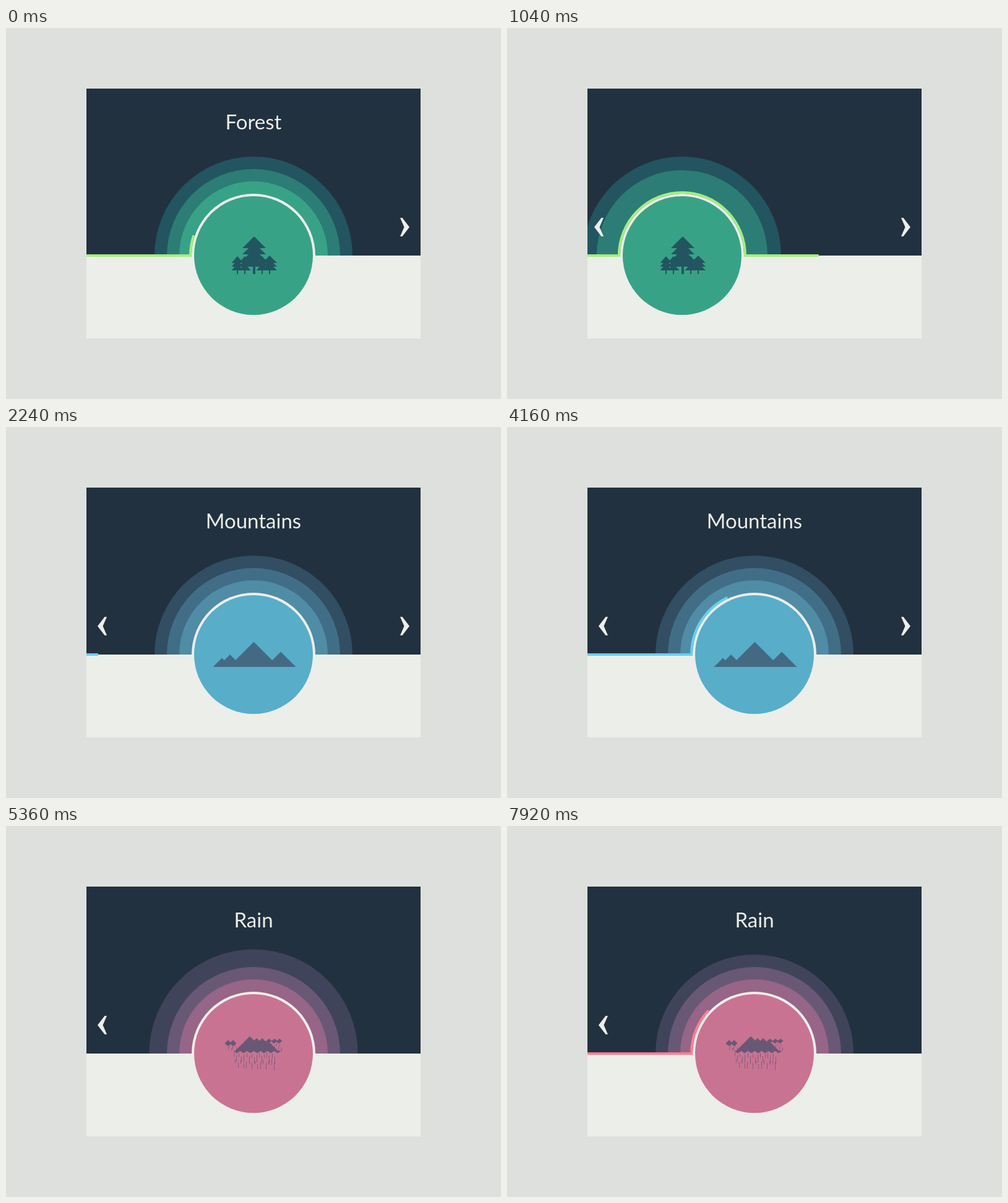
An HTML page with a canvas that plays this animation: 800x600 px, repeating every 8000 ms.

```html
<!DOCTYPE html>
<html lang="en">
<head>
<meta charset="utf-8">
<title>Landscape slider</title>
<style>
  html, body { margin: 0; width: 100%; height: 100%; overflow: hidden; background: #dde0dd; }
  canvas { display: block; }
</style>
</head>
<body>
<canvas id="stage" width="800" height="600"></canvas>
<script>
const ctx = document.getElementById('stage').getContext('2d');
const LOOP = 8000, STEP = 80;
const GAP = 3880;            // time between two slide changes
const SWITCH = 880;          // start of a slide change
const CX = 400, HORIZON = 368;
const CARD = { x: 130, y: 98, w: 540, h: 404 };
const PAGE = '#dde0dd', DARK = '#22313f', LIGHT = '#eceeea';

// Share of a tween that has passed, from 0 to 1.
const part = (t, start, length) => Math.min(1, Math.max(0, (t - start) / length));
const cubicIn = p => p ** 3;
const cubicOut = p => 1 - (1 - p) ** 3;
const cubicInOut = p => p < 0.5 ? 4 * p ** 3 : 1 - 4 * (1 - p) ** 3;
const backOut = p => 1 + 2.70158 * (p - 1) ** 3 + 1.70158 * (p - 1) ** 2;

const slide = t => CARD.w * cubicInOut(part(t, 900, 370));
const arrowIn = t => cubicOut(part(t, SWITCH, 370));

// The line speeds up exponentially until it stops short of the card edge.
const lineLength = u => Math.min(606.5, 13.6 * Math.expm1(0.00115 * Math.max(0, u - 1480)));

// Rings pop open one after another, then shrink in the same order.
function ringRadius(i, u) {
  const open = backOut(part(u, 1085 + 100 * i, 250));
  const shut = cubicIn(part(u, SWITCH + GAP + 100 * i, 250));
  return Math.max(0, (120 + 20 * i) * open * (1 - shut));
}

function poly(...pts) {
  ctx.beginPath();
  for (let i = 0; i < pts.length; i += 2) ctx.lineTo(pts[i], pts[i + 1]);
  ctx.closePath();
  ctx.fill();
}

function disc(r, color) {
  ctx.fillStyle = color;
  ctx.beginPath();
  ctx.arc(CX, HORIZON, r, 0, 7);
  ctx.fill();
}

// Triangle on a flat base; a negative height points down.
const peak = (x, base, half, height = half) =>
  poly(x - half, base, x, base - height, x + half, base);

function tree(x, base, half, height, gap, trunk) {
  for (let i = 0; i < 3; i++) peak(x, base - i * gap, half, height);
  ctx.fillRect(x - trunk / 2, base, trunk, 398 - base);
}

function forest() {
  tree(401, 376, 19, 19, 10, 4);
  peak(401, 386, 20, 29);
  for (const x of [374, 386, 414]) tree(x, 392, 9.5, 11, 6, 2);
  tree(426, 392, 12, 12, 6, 2);
}

function mountains() {
  peak(349, 388, 14.5);
  peak(362, 388, 20);
  peak(400.5, 388, 40.5);
  peak(444, 388, 24.5);
}

function drops(x, y, count, gap, size) {
  for (let i = 0; i < count; i++) {
    const a = (i * 0.618) % 1, b = (i * 0.414 + 0.2) % 1;
    ctx.fillRect(Math.round(x + i * gap), Math.round(y + a * 8), 1, size * (0.6 + b));
  }
}

function rain() {
  peak(394, 364, 24);
  for (const x of [405, 414, 424]) peak(x, 364, 426 - x + 14 > 21 ? 21 : 16);
  for (let x = 373; x < 440; x += 11) peak(x, 363.5, 6, -4);
  for (const x of [359, 367]) { peak(x, 351, 5); peak(x, 351, 6, -5); }
  for (const x of [425, 434, 442]) { peak(x, 348, 5, 4); peak(x - 1, 348, 5, -4); }
  ctx.globalAlpha = 0.75;
  drops(368, 366, 17, 4.1, 8);
  drops(370, 377, 15, 4.5, 8);
  drops(356, 352, 7, 2.6, 4);
  drops(424, 350, 9, 2.6, 5);
  ctx.globalAlpha = 1;
}

const scenes = [
  { title: 'Forest', icon: forest, ink: '#225560', line: '#a3ee7c', face: '#38a287',
    rings: ['#38a287', '#2c7d76', '#225560'] },
  { title: 'Mountains', icon: mountains, ink: '#446a83', line: '#66d0ef', face: '#58adc9',
    rings: ['#508ca5', '#416e87', '#314e63'] },
  { title: 'Rain', icon: rain, ink: '#685876', line: '#fb7e93', face: '#c97392',
    rings: ['#966587', '#685876', '#40445b'] }
];

function drawLine(length, color) {
  if (length <= 0) return;
  ctx.strokeStyle = color;
  ctx.lineWidth = 4;
  ctx.setLineDash([length, 2000]);
  ctx.beginPath();
  ctx.moveTo(130, HORIZON);
  ctx.lineTo(298, HORIZON);
  ctx.arc(CX, HORIZON, 102, Math.PI, 2 * Math.PI);
  ctx.lineTo(670, HORIZON);
  ctx.stroke();
  ctx.setLineDash([]);
}

function drawScene(s, u, shift) {
  ctx.save();
  ctx.translate(shift, 0);

  ctx.save();
  ctx.beginPath();
  ctx.rect(0, 0, 800, HORIZON);
  ctx.clip();
  for (let i = 2; i >= 0; i--) disc(ringRadius(i, u), s.rings[i]);
  ctx.restore();

  disc(100, LIGHT);
  disc(96, s.face);
  ctx.fillStyle = s.ink;
  s.icon();
  drawLine(lineLength(u), s.line);

  if (u < SWITCH + GAP) {
    ctx.fillStyle = LIGHT;
    ctx.font = '33px Lato, sans-serif';
    ctx.textAlign = 'center';
    ctx.fillText(s.title, CX, 164);
  }
  ctx.restore();
}

// dir 1 points right, -1 left; shown runs from 0 (past the card edge) to 1.
function drawArrow(dir, shown) {
  if (shown <= 0) return;
  ctx.save();
  ctx.translate(CX, 322);
  ctx.scale(dir, 1);
  ctx.translate(38 * (1 - shown), 0);
  ctx.fillStyle = LIGHT;
  poly(237, -15, 240.5, -15, 252, 0, 240.5, 15, 237, 15, 243.5, 0);
  ctx.restore();
}

function draw(t) {
  ctx.fillStyle = PAGE;
  ctx.fillRect(0, 0, 800, 600);
  ctx.save();
  ctx.beginPath();
  ctx.rect(CARD.x, CARD.y, CARD.w, CARD.h);
  ctx.clip();
  ctx.fillStyle = DARK;
  ctx.fillRect(CARD.x, CARD.y, CARD.w, HORIZON - CARD.y);
  ctx.fillStyle = LIGHT;
  ctx.fillRect(CARD.x, HORIZON, CARD.w, CARD.h);

  const scroll = slide(t) + slide(t - GAP);
  scenes.forEach((s, i) => {
    const shift = i * CARD.w - scroll;
    if (Math.abs(shift) < CARD.w) drawScene(s, t - (i - 1) * GAP, shift);
  });

  drawArrow(-1, arrowIn(t));
  drawArrow(1, 1 - arrowIn(t - GAP));
  ctx.restore();
}

const start = performance.now();
function tick() {
  const t = (performance.now() - start) % LOOP;
  draw(Math.floor(t / STEP) * STEP);
  requestAnimationFrame(tick);
}
tick();
</script>
</body>
</html>
```
